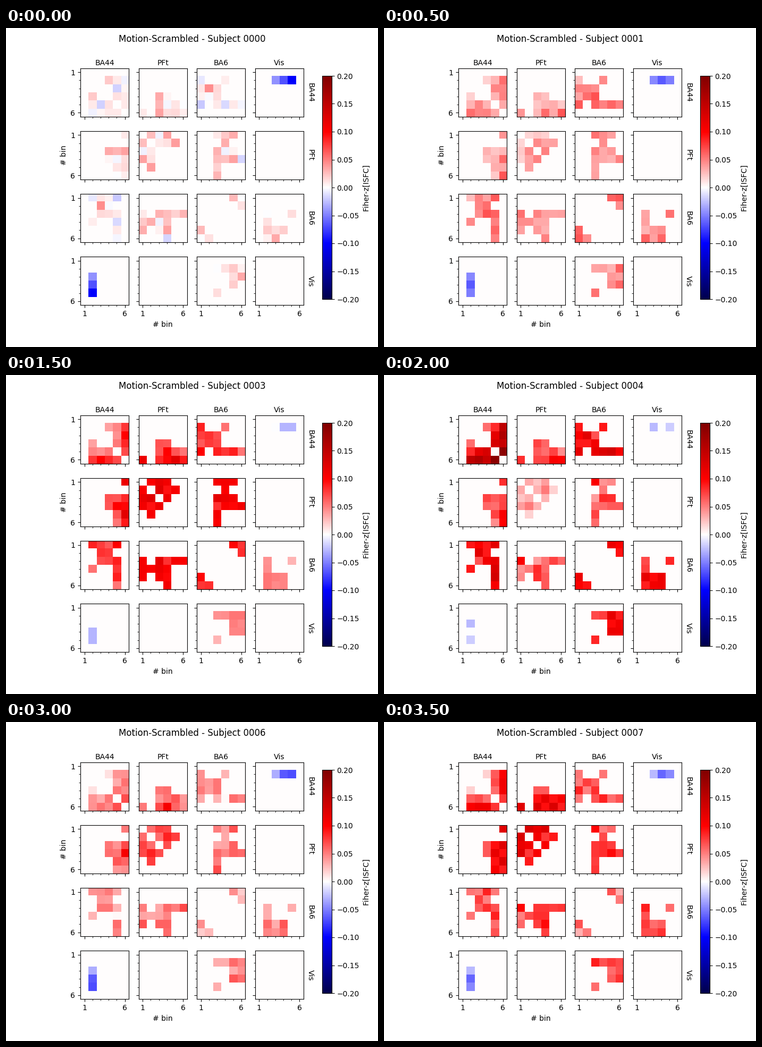
A matplotlib script for the animation above (4 s loop, 700 px wide and 600 px high).

```python
import numpy as np
import matplotlib.pyplot as plt
from matplotlib.animation import FuncAnimation

plt.rcParams["font.family"] = "DejaVu Sans"
plt.rcParams["text.kerning_factor"] = 6

REGIONS = ["BA44", "PFt", "BA6", "Vis"]
BINS = 6
SUBJECTS = 8
KEYS = [0, 2, 3, 4, 6, 7]  # subjects with a key point; the rest lie between
NOISE = 0.013

rng = np.random.default_rng(44)


def strength(*keys):
    """Coupling strength of one region for every subject, keys in thousandths."""
    return np.interp(range(SUBJECTS), KEYS, keys) / 1000


ba44 = strength(2, 43, 29, 60, 21, 40)
pft = strength(13, 22, 56, 16, 32, 53)
ba6 = strength(4, 44, 44, 47, 17, 25)
vis = strength(9, 36, -2, 56, 30, 47)

# subject, region row, region column, bin row, bin column
isfc = np.zeros((SUBJECTS, 4, 4, BINS, BINS))


def connect(a, b, level, links, row_tilt=0, col_tilt=0):
    """Link bins of two regions around a level, tilted over the bins, with its mirror."""
    cells = np.array([(r, c) for r, cols in links.items() for c in cols])
    offset = cells - cells.mean(axis=0)
    tilt = 1 + offset @ [row_tilt, col_tilt]
    for (r, c), t in zip(cells - 1, tilt):
        z = level * t + rng.normal(0, NOISE, SUBJECTS)
        isfc[:, a, b, r, c] = z
        isfc[:, b, a, c, r] = z


connect(0, 0, 2 * ba44, {2: [4, 5, 6], 3: [5, 6], 4: [5, 6], 5: [6]},
        row_tilt=0.06, col_tilt=0.4)
connect(0, 1, ba44 + pft, {4: [3, 4], 5: [3, 4, 5, 6], 6: [1, 3, 4, 5, 6]},
        row_tilt=0.2)
connect(0, 2, ba44 + ba6, {2: [1, 4], 3: [1, 2, 3], 4: [1, 2, 3], 5: [1, 3, 4, 5, 6]},
        row_tilt=0.06)
connect(0, 3, 1.3 * ba6 - 0.08, {2: [3, 4, 5]}, col_tilt=0.35)
connect(1, 1, 2 * pft, {1: [2, 3, 4], 2: [3, 4, 5], 3: [4]})
connect(1, 2, pft + ba6,
        {1: [3, 4, 5], 2: [4], 3: [3, 4, 5], 4: [3, 4, 5, 6], 5: [3], 6: [3]})
connect(2, 2, 2 * ba6, {1: [5, 6], 2: [6]})
connect(2, 3, ba6 + vis, {3: [2, 5], 4: [2], 5: [2, 3, 4], 6: [2, 3, 4]},
        row_tilt=0.05)

fig, axes = plt.subplots(4, 4, sharex=True, sharey=True, figsize=(7, 6), dpi=100)
fig.subplots_adjust(left=0.2, right=0.8, top=0.88, bottom=0.125, wspace=0.2, hspace=0.2)
title = fig.suptitle("", fontsize=12)

images = {}
for (a, b), ax in np.ndenumerate(axes):
    images[a, b] = ax.imshow(isfc[0, a, b], cmap="seismic", vmin=-0.2, vmax=0.2)
    ax.set_xticks(range(1, BINS - 1), minor=True)
    ax.set_yticks(range(1, BINS - 1), minor=True)

for axis in (axes[0, 0].xaxis, axes[0, 0].yaxis):
    axis.set_ticks([0, BINS - 1], labels=["1", "6"])

for k, name in enumerate(REGIONS):
    axes[0, k].set_title(name, fontsize=10, pad=4)
    axes[k, 3].annotate(name, (1, 0.5), xytext=(4, 0), xycoords="axes fraction",
                        textcoords="offset points", rotation=270,
                        ha="left", va="center", fontsize=10)
axes[1, 0].set_ylabel("# bin")
axes[3, 1].set_xlabel("# bin")

bar = fig.colorbar(images[0, 0], cax=fig.add_axes([0.85, 0.15, 0.025, 0.7]))
bar.set_label("Fiher-z[ISFC]")


def update(subject):
    title.set_text(f"Motion-Scrambled - Subject {subject:04d}")
    for (a, b), image in images.items():
        image.set_data(isfc[subject, a, b])
    return [title, *images.values()]


anim = FuncAnimation(fig, update, frames=SUBJECTS, interval=500, repeat=True, repeat_delay=0)

plt.show()
```
